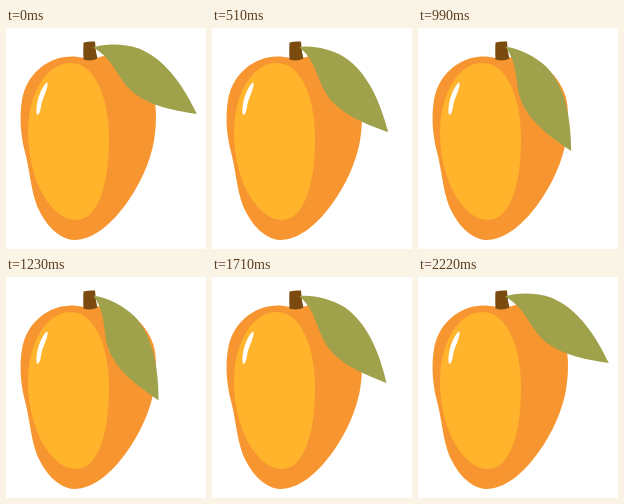
Animation of 200 by 221 pixels, one loop 2.25 s. Source, as an HTML page:

```html
<!DOCTYPE html>
<html lang="en">
<head>
<meta charset="utf-8">
<title>Mango</title>
<style>
  html, body { margin: 0; width: 100%; height: 100%; overflow: hidden; background: #fff; }
  svg { display: block; width: 100%; height: 100%; }
</style>
</head>
<body>
<svg viewBox="0 0 200 221">
  <path fill="#f79530" d="M66 28.500 C74 28.500 79 31 86 31 C93 30 98 26 106 28
    C126 34 142 50 147.500 68 C151 80 150.500 97 148 113 C144 134 135 155 120 176
    C106 195 88 212 68 212 C52 211 39 196 31 178 C24.500 160 24 143 19 124
    C15 109 13 90 16 72 C20 47 41 28.500 66 28.500 Z"/>
  <path fill="#ffb42c" d="M65 35 C88 35 103 68 103 111 C103 156 92 192 70 192
    C45 192 22 152 22 105 C22 64 41 35 65 35 Z"/>
  <path fill="#fff" d="M41.500 54.500 C42.500 60 37 69 35.500 76 C34.500 81 34 86 31.500 87
    C29.500 86 30.500 75 33 68 C35.500 61 39 55 41.500 54.500 Z"/>
  <path fill="#7a4a0e" d="M77.500 14.500 Q83 13 89 13.500 L90 24 L91.500 30.500
    Q85 34 77.500 31.500 Q77 23 77.500 14.500 Z"/>
  <path id="leaf" fill="#9fa14b" d="M87 19.500 C99 15 119 15.500 133 20.500 C159 31 177 57 190.800 86
    C165 82 138 77 122 59.500 C110 46 106 30 87 19.500 Z"/>
</svg>
<script>
  const LOOP = 2250, STEP = 30, SWING = 26;
  const leaf = document.getElementById('leaf');

  function draw(now) {
    const t = Math.floor((now % LOOP) / STEP) * STEP;
    const angle = SWING * (1 - Math.cos(2 * Math.PI * t / LOOP)) / 2;
    leaf.setAttribute('transform', `rotate(${angle.toFixed(3)} 89 20)`);
  }

  let start;
  function tick(now) {
    start ??= now;
    draw(now - start);
    requestAnimationFrame(tick);
  }
  draw(0);
  requestAnimationFrame(tick);
</script>
</body>
</html>
```
